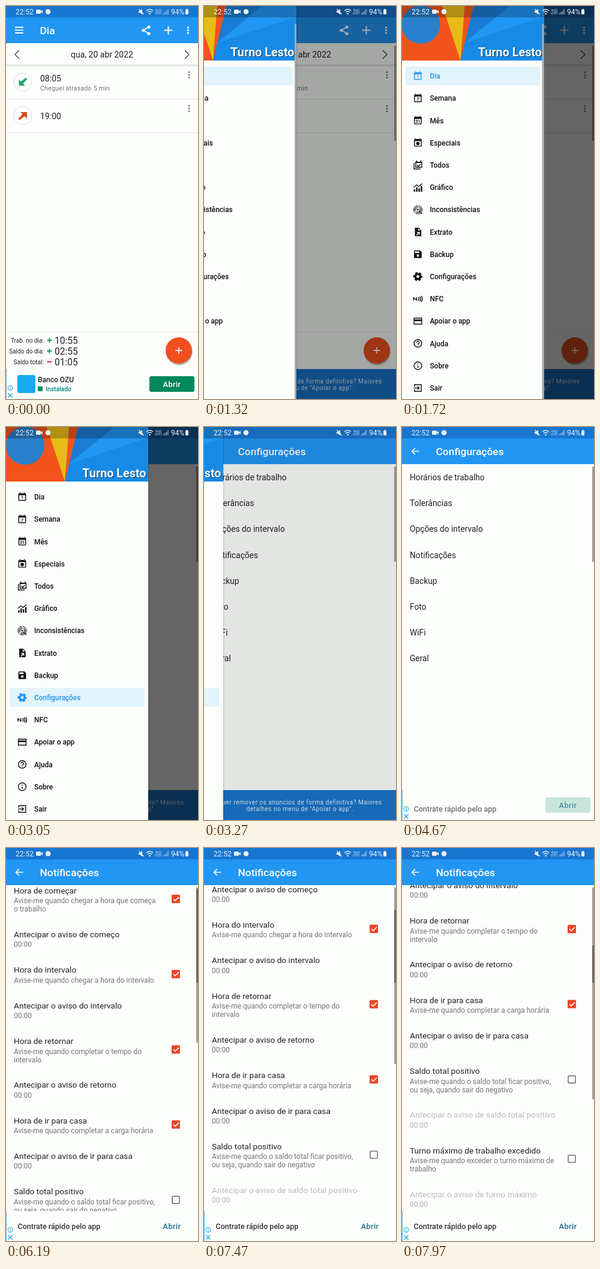
These frames come from a looping animation (320x656 px, 8000 ms). An HTML page:

```html
<!DOCTYPE html>
<html lang="pt-BR">
<head>
<meta charset="utf-8">
<title>Registro de turnos</title>
<style>
html, body { margin: 0; width: 100%; height: 100%; overflow: hidden; background: #fcfefc; }
svg { display: block; }
#stage { width: 320px; height: 656px; font-family: Roboto, sans-serif; }
.line { fill: none; stroke: currentColor; stroke-width: 2; }
.menu { color: #111; }
.menu.on { color: #2196f3; }
.menu.on .pill { fill: #e1f3fb; }
</style>
</head>
<body>
<svg id="stage" viewBox="0 0 320 656" xmlns="http://www.w3.org/2000/svg"></svg>
<script>
const INK = '#222', GREY = '#757575', BLUE = '#2196f3', ORANGE = '#f0501e', PAPER = '#fcfefc';
const MEDIUM = 'font-weight="500"', MIDDLE = 'text-anchor="middle"';

// y is the vertical middle of the text
const text = (x, y, s, size, fill = INK, more = '') =>
  `<text x="${x}" y="${(y + size * .36).toFixed(1)}" font-size="${size}" fill="${fill}" ${more}>${s}</text>`;
const rect = (x, y, w, h, fill, more = '') =>
  `<rect x="${x}" y="${y}" width="${w}" height="${h}" fill="${fill}" ${more}/>`;
const circle = (x, y, r, fill, more = '') =>
  `<circle cx="${x}" cy="${y}" r="${r}" fill="${fill}" ${more}/>`;
const path = (d, stroke, width = 2, more = '') =>
  `<path d="${d}" fill="none" stroke="${stroke}" stroke-width="${width}" ${more}/>`;
const shape = (d, fill = 'currentColor') => `<path d="${d}" fill="${fill}" fill-rule="evenodd"/>`;
const group = (id, body) => `<g id="${id}">${body}</g>`;
const dots = (x, y, fill, gap = 4.5, r = 1.6) => [-gap, 0, gap].map(d => circle(x, y + d, r, fill)).join('');

function dayPage() {
  const entry = (y, arrow, color) =>
    circle(28, y, 15, '#fff', 'stroke="#dcdcdc"') + shape(arrow, color) +
    dots(305, y - 12, '#858585') + rect(0, y + 28, 320, 1, '#e2e4e2');
  const total = (y, label, plus, value) =>
    text(63, y, label, 10.1, INK, 'text-anchor="end"') +
    path(`M68.5 ${y}h8` + (plus ? `M72.5 ${y - 4}v8` : ''), plus ? '#2e9560' : '#dc3058') +
    text(81, y, value, 15.6);
  return rect(0, 98, 320, 1, '#d3d5d3') + rect(0, 99, 320, 2, '#eceeec') +
    path('M22 74l-7 7 7 7M298 74l7 7-7 7', '#333', 1.2) +
    text(160, 81, 'qua, 20 abr 2022', 14, INK, MIDDLE) +
    entry(127, 'M33.5 119.5L35.5 122 28.5 129.5 32 133H21.5V122.5L25 126z', '#22a566') +
    text(57, 121, '08:05', 14) +
    text(57, 137, 'Cheguei atrasado 5 min', 10.5, GREY, 'letter-spacing=".25"') +
    entry(183, 'M22.5 190.5L20.5 188 27.5 180.5 24 177H35V188L31 184z', '#dd4a1c') +
    text(57, 184, '19:00', 14) +
    rect(0, 544, 320, 1, '#eceeec') +
    total(558, 'Trab. no dia:', true, '10:55') +
    total(576, 'Saldo do dia:', true, '02:55') +
    total(594, 'Saldo total:', false, '01:05') +
    circle(288.5, 578, 22, '#000', 'opacity=".16"') + circle(289, 577, 22, '#000', 'opacity=".14"') +
    circle(288, 575, 22, ORANGE) + path('M282.5 575h11M288 569.5v11', '#fff', 1.8);
}

function settingsPage() {
  const rows = ['Horários de trabalho', 'Tolerâncias', 'Opções do intervalo', 'Notificações',
    'Backup', 'Foto', 'WiFi', 'Geral'];
  return rect(0, 62, 320, 544, PAPER) + rect(0, 192, 320, 43, '#000', 'id="ripple" opacity="0"') +
    rows.map((s, i) => text(13, 84 + 43.2 * i, s, 13.75)).join('');
}

function noticeRows() {
  const rows = [
    ['Hora de começar', 'Avise-me quando chegar a hora que começa|o trabalho', 'on'],
    ['Antecipar o aviso de começo', '00:00'],
    ['Hora do intervalo', 'Avise-me quando chegar a hora do intervalo', 'on'],
    ['Antecipar o aviso do intervalo', '00:00'],
    ['Hora de retornar', 'Avise-me quando completar o tempo do|intervalo', 'on'],
    ['Antecipar o aviso de retorno', '00:00'],
    ['Hora de ir para casa', 'Avise-me quando completar a carga horária', 'on'],
    ['Antecipar o aviso de ir para casa', '00:00'],
    ['Saldo total positivo', 'Avise-me quando o saldo total ficar positivo,|ou seja, quando sair do negativo', 'off'],
    ['Antecipar o aviso de saldo total positivo', '00:00', 'dim'],
    ['Turno máximo de trabalho excedido', 'Avise-me quando exceder o turno máximo de|trabalho', 'off'],
    ['Antecipar o aviso de turno máximo', '00:00', 'dim'],
  ];
  let y = 84, out = '';
  for (const [title, note, kind] of rows) {
    const lines = note.split('|'), mid = y + 7 * lines.length, dim = kind === 'dim';
    out += text(13, y, title, 13.7, dim ? '#bbb' : INK);
    lines.forEach((s, i) => out += text(13, y + 17 + 14 * i, s, 12, dim ? '#b0b0b0' : GREY));
    if (kind === 'on')
      out += rect(276, mid - 7, 14, 14, '#ee4628', 'rx="1.5"') + path(`M279 ${mid}l3 3 6-6`, '#fff', 1.6);
    if (kind === 'off')
      out += rect(277, mid - 6, 12, 12, 'none', 'rx="1" stroke="#757575" stroke-width="1.6"');
    y += lines.length > 1 ? 73 : 59.4;
  }
  return out;
}

function header() {
  const title = s => text(56.5, 41, s, 17.4, '#fff', MEDIUM);
  return rect(0, 0, 320, 62, BLUE) + rect(0, 0, 320, 19, '#1976d0') +
    group('dayBar', title('Dia') +
      path('M15 35.5h14M15 40.3h14M15 45h14', '#fff', 1.8) +
      path('M238 35l-9 5.5 9 5.5', '#fff', 1.6) +
      circle(238, 35, 2.6, '#fff') + circle(229, 40.5, 2.6, '#fff') + circle(238, 46, 2.6, '#fff') +
      path('M263.5 40.5h14M270.5 33.5v14', '#fff', 2) + dots(303.5, 40.5, '#fff', 4.6, 1.7)) +
    group('backBar', path('M28.5 40.5H17M22 35l-5.5 5.5 5.5 5.5', '#fff', 1.7) +
      group('setTitle', title('Configurações')) + group('noteTitle', title('Notificações')));
}

function banner() {
  const open = fill => text(276.5, 631, 'Abrir', 12.8, fill, MEDIUM + ' ' + MIDDLE + ' letter-spacing=".4"');
  const promo = (y, s) => text(160, y, s, 10, '#e8eef5', MIDDLE + ' letter-spacing=".53"');
  return group('promo', rect(0, 606, 320, 50, '#1976cb') +
      promo(626, 'Quer remover os anúncios de forma definitiva? Maiores') +
      promo(637.5, 'detalhes no menu de "Apoiar o app".')) +
    group('ad', rect(0, 606, 320, 50, PAPER) + rect(0, 606, 1, 50, '#62b8f2') +
      group('adOne', rect(19, 616, 30, 30, '#16aaf0', 'rx="3"') +
        text(53, 624, 'Banco OZU', 12, INK, MEDIUM) +
        rect(53, 635, 8, 8, '#0a9070') + text(66, 639, 'Instalado', 10.3, '#00897b', MEDIUM)) +
      group('adButton', rect(239, 618, 75, 26, '#00875c', 'rx="3"') + open('#fff')) +
      group('adTwo', text(19.5, 631, 'Contrate rápido pelo app', 12.5, '#333', MEDIUM)) +
      group('adLink', open('#216d8a')) +
      circle(7, 637.5, 4, '#fff', 'stroke="#1ba4d8"') + path('M7 635v1.2M7 637v3', '#1ba4d8', 1.2) +
      path('M3.5 646.5l7 7M10.5 646.5l-7 7', '#1ba4d8', 1.3));
}

function drawer() {
  const stroke = (d, w = 2) => path(d, 'currentColor', w);
  const glyph = s => text(12, 13.5, s, 10, 'currentColor', MIDDLE + ' font-weight="700"');
  const ring = (r, more = '') => `<circle class="line" cx="12" cy="12" r="${r}" ${more}/>`;
  const cal = shape('M5 3h14a2 2 0 0 1 2 2v14a2 2 0 0 1-2 2H5a2 2 0 0 1-2-2V5a2 2 0 0 1 2-2zM5 8v11h14V8zM6 1h2v3H6zM16 1h2v3h-2z');
  const items = [
    ['Dia', cal + glyph('1')],
    ['Semana', cal + glyph('7')],
    ['Mês', cal + glyph('31')],
    ['Especiais', cal + circle(12, 13.5, 4, 'currentColor')],
    ['Todos', stroke('M7 5h14v12H7zM3 7v14h15M9 1v4M19 1v4M7 6h14M10 12l3 3 5-5')],
    ['Gráfico', stroke('M4 22v-6M9.5 22V12M15 22v-8M20.5 22V9', 3.4) + stroke('M2 12l7-6 5 4 8-7')],
    ['Inconsistências', [10, 7.5, 5].map(r =>
      ring(r, `style="stroke-width:1.4" stroke-dasharray="${r * 2.2} 2"`)).join('') +
      circle(12, 12, 2, 'currentColor') + stroke('M15 15l7 7')],
    ['Extrato', shape('M5 2h9l6 6v14H5zM13 3.5V9h5.5zM10 12v2h3l-5 5 1.5 1.5 5-5v3h2V12z')],
    ['Backup', shape('M5 3h12l4 4v12a2 2 0 0 1-2 2H5a2 2 0 0 1-2-2V5a2 2 0 0 1 2-2zM5 5v4h10V5zM12 12a3 3 0 1 0 .1 0z')],
    ['Configurações', ring(5.9, 'style="stroke-width:5"') +
      ring(8.8, 'style="stroke-width:3.6" stroke-dasharray="5.6 3.615" stroke-dashoffset="2.8"')],
    ['NFC', stroke('M2 16V9l7 6V8M13 8q3 4 0 8M16.5 6.5q4 5.5 0 11M20 5q5 7 0 14')],
    ['Apoiar o app', stroke('M3 5h18v14H3z') + rect(3, 8, 18, 4, 'currentColor')],
    ['Ajuda', ring(9) + stroke('M9 10a3 3 0 1 1 4.5 2.5Q12 13.5 12 15M12 16.5v2')],
    ['Sobre', ring(9) + stroke('M12 7v2M12 11v6')],
    ['Sair', stroke('M4 9V4h16v16H4v-5M2 12h12M11 8l4 4-4 4')],
  ];
  const row = ([name, icon], i) => {
    const y = 116.8 + 37.2 * i;
    return `<g class="menu" id="item${i}">` + rect(6, y - 16, 225, 31.5, 'none', 'class="pill" rx="4"') +
      `<g transform="translate(18.5 ${y - 8.5}) scale(.71)">${icon}</g>` +
      text(47, y, name, 11.9, 'currentColor', MEDIUM) + '</g>';
  };
  const title = (dx, dy, fill) =>
    text(233.5 + dx, 76.5 + dy, 'Turno Lesto', 19.8, fill, 'text-anchor="end" font-weight="700"');
  return rect(WIDTH, 0, 1.5, 656, '#000', 'opacity=".12"') + rect(0, 0, WIDTH, 656, PAPER) +
    rect(0, 0, WIDTH, 91, BLUE) +
    shape('M120 0h60L104 62z', '#1a7cd4') + shape('M104 62L237 18v73H98z', '#178ae6') +
    shape('M0 0H120L98 91H0z', '#f2541b') +
    shape('M68 0h37L98 91z', '#e8bc18') +
    circle(32, 31, 32, '#2a80cc') +
    rect(0, 0, WIDTH, 19, '#000', 'opacity=".24"') +
    title(1.2, 1.5, 'rgba(0,0,0,.5)') + title(0, 0, '#fff') +
    items.map(row).join('') +
    rect(WIDTH - 3, 30, 3, 626, '#a9aba9', 'id="menuBar"');
}

function statusBar() {
  const c = '#e9f1f8';
  return text(16, 9.5, '22:52', 12, c) +
    rect(50, 6, 8, 7, c, 'rx="1.5"') + shape('M58 9l3-2.5v6L58 10z', c) +
    circle(70, 9.5, 4.3, c) +
    shape('M221 8h2l4-3v9l-4-3h-2z', c) + path('M221.5 5l8 9', c, 1.2) +
    path('M234 8q5.5-5 11 0M236 10.5q3.5-3 7 0', c, 1.3) + circle(239.5, 13, 1.3, c) +
    text(254, 6.5, 'Vo))', 5.5, c, MIDDLE) + text(254, 12, 'LTE1', 5.5, c, MIDDLE) +
    path('M262.5 14v-2M265 14v-4M267.5 14V8M270 14V5', c, 1.2, 'opacity=".7"') +
    text(275, 9.5, '94%', 12, c) +
    rect(299, 6, 5, 8, c, 'rx=".8"') + rect(300.3, 4.8, 2.4, 1.5, c);
}

const LOOP = 8000, WIDTH = 237, LAG = 15;

const stage = document.getElementById('stage');
stage.innerHTML = rect(0, 0, 320, 656, PAPER) +
  group('day', dayPage()) + group('settings', settingsPage()) +
  group('notices', rect(0, 62, 320, 544, PAPER) + group('rows', noticeRows())) +
  header() + banner() +
  rect(317, 66, 3, 159, '#000', 'id="bar" opacity=".38"') +
  rect(317, 62, 3, 257, '#000', 'id="thumb" opacity=".36"') +
  rect(0, 0, 320, 656, '#000', 'id="scrim"') +
  group('drawer', drawer()) + statusBar();

const el = {};
stage.querySelectorAll('[id]').forEach(n => el[n.id] = n);
const show = (id, on) => el[id].style.display = on ? '' : 'none';
const fade = (id, v) => el[id].setAttribute('opacity', v);
const move = (id, x, y) => el[id].setAttribute('transform', `translate(${x} ${y})`);
const clamp = v => Math.min(1, Math.max(0, v));

const bursts = [[0, 0, 1], [1320, 1720, 100], [2400, 2400, 1], [2950, 2950, 1], [3070, 3570, 100],
  [4370, 4670, 100], [4700, 5100, 100], [6160, 6190, 30], [7270, 7970, 100]];
const marks = bursts.flatMap(([a, b, d]) => Array.from({ length: (b - a) / d + 1 }, (_, i) => a + i * d));

function drawerWidth(t) {
  if (t < 1300 || t >= 3550) return 0;
  if (t < 2900) return WIDTH - 83 * Math.exp((1320 - t) / 80);
  return Math.min(WIDTH, 32 * Math.exp((3270 - t) / 85));
}

function scrollAt(t) {
  if (t < 6160) return 0;
  if (t < 6190) return 6;
  return 13 + 201 * clamp((t - 7170) / 800);
}

function draw(t) {
  const w = drawerWidth(t), inSettings = t >= 2950, inNotices = t >= 5000;
  show('day', !inSettings);
  show('dayBar', !inSettings);
  show('settings', inSettings && !inNotices);
  show('backBar', inSettings);
  show('setTitle', !inNotices);
  show('noteTitle', inNotices);
  show('notices', inNotices);
  show('bar', t >= 1320);
  show('thumb', inNotices);
  fade('ripple', t >= 4800 ? .1 : 0);

  // The shade trails slightly behind the drawer
  show('drawer', w > 0);
  move('drawer', w - WIDTH, 0);
  fade('scrim', .6 * drawerWidth(t - LAG) / WIDTH);
  show('menuBar', t < 2400);
  el.item0.classList.toggle('on', t < 2400);
  el.item9.classList.toggle('on', t >= 2400);

  const k = clamp((t - 4370) / 600);
  show('ad', t < 1320 || t >= 3570);
  fade('adOne', clamp(1 - 2 * k));
  fade('adButton', clamp(1 - 1.6 * k));
  fade('adTwo', clamp(1.4 * k));
  fade('adLink', clamp(1.6 * k));
  move('adTwo', 0, 12 * (1 - k));

  const s = scrollAt(t);
  move('rows', 0, -s);
  move('thumb', 0, s * .47);
}

let last = -1;
function tick() {
  const t = performance.now() % LOOP;
  const step = marks.filter(m => m <= t).pop();
  if (step !== last) draw(last = step);
  requestAnimationFrame(tick);
}
tick();
</script>
</body>
</html>
```
